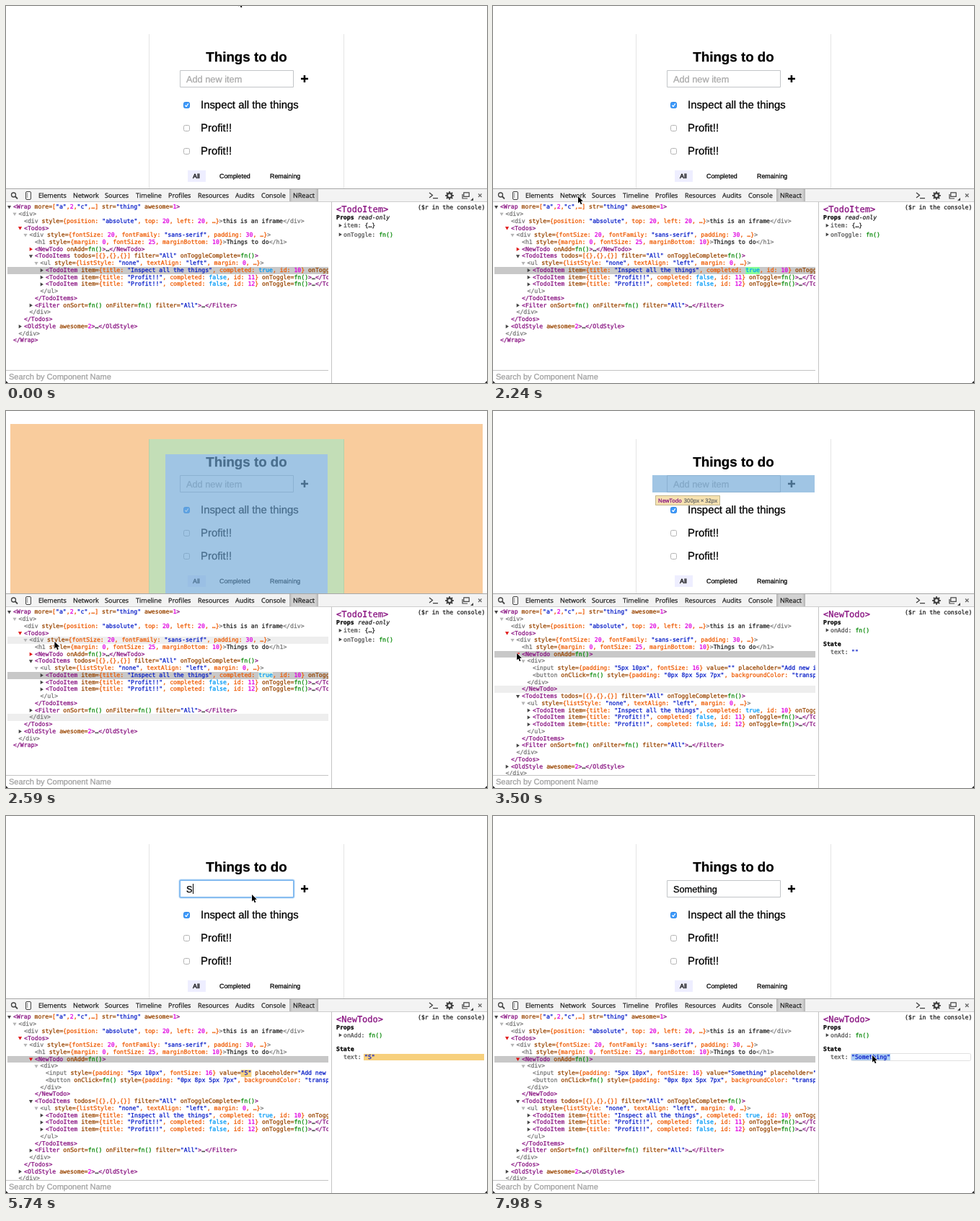
An HTML page with a canvas that plays this animation: 667 px wide and 523 px high, repeating every 8 s.

```html
<!DOCTYPE html>
<html lang="en">
<head>
<meta charset="utf-8">
<title>Component inspector</title>
<style>
html, body { margin: 0; width: 100%; height: 100%; overflow: hidden; background: #fff; }
canvas { display: block; }
</style>
</head>
<body>
<canvas id="stage" width="667" height="523"></canvas>
<script>
const ctx = document.getElementById('stage').getContext('2d');
const LOOP = 8000, STEP = 70;
const CW = 4.92, ROW = 9.74, TREE_TOP = 274.3;
const SANS = '"Liberation Sans", Arial, sans-serif';
const MONO = '"DejaVu Sans Mono", monospace';
const UI = '"Open Sans", sans-serif';
const CODE = `${CW / 0.602}px ${MONO}`;
const C = {
  comp: '#881280', dom: '#777', attr: '#994500', key: '#ee5a00', str: '#0a1fc8',
  num: '#e000e0', bool: '#0099f5', fn: '#0a8a0a', text: '#222'
};

// Times at which things happen
const T = { hover: 910, off: 1610, on: 1960, select: 3150, expand: 3290, focus: 4970,
  type: 5740, typed: 6380, field: 7350, edit: 7770 };

// Pointer path: time, x, y
const PATH = [
  [0, 322, -9], [140, 322, -9], [210, 319, 30], [280, 305, 118], [350, 299, 142], [560, 299, 142],
  [630, 297, 137], [840, 297, 137], [1050, 292, 137], [1120, 292, 137], [1260, 285, 134],
  [1330, 285, 134], [1540, 303, 134], [1960, 303, 134], [2170, 139, 228], [2240, 118, 264],
  [2310, 100, 285], [2380, 88, 302], [2450, 82, 310], [2660, 60, 325], [2870, 40, 336],
  [3010, 33, 336], [3990, 33, 336], [4060, 50, 325], [4130, 78, 313], [4200, 140, 288],
  [4270, 230, 238], [4340, 328, 165], [4410, 373, 135], [4620, 362, 121], [4830, 344, 109],
  [5040, 341, 109], [6930, 341, 109], [7000, 380, 113], [7070, 450, 140], [7210, 575, 280],
  [7350, 624, 340], [7420, 622, 338], [7700, 526, 332], [8000, 526, 332]
];

const clamp = (v, a, b) => Math.max(a, Math.min(b, v));

function pointer(t) {
  const i = Math.max(1, PATH.findIndex(p => p[0] >= t));
  const [t0, x0, y0] = PATH[i - 1], [t1, x1, y1] = PATH[i];
  const u = clamp((t - t0) / (t1 - t0), 0, 1);
  return { x: x0 + (x1 - x0) * u, y: y0 + (y1 - y0) * u };
}

function rect(x, y, w, h, color) {
  ctx.fillStyle = color;
  ctx.fillRect(x, y, w, h);
}

function frame(x, y, w, h, color) {
  ctx.strokeStyle = color;
  ctx.lineWidth = 1;
  ctx.strokeRect(x + .5, y + .5, w - 1, h - 1);
}

function rounded(x, y, w, h, r, fill, stroke) {
  ctx.beginPath();
  ctx.roundRect(x, y, w, h, r);
  if (fill) { ctx.fillStyle = fill; ctx.fill(); }
  if (stroke) { ctx.strokeStyle = stroke; ctx.lineWidth = 1; ctx.stroke(); }
}

// A hairline outline gives the slightly heavy look of smoothed type
function text(s, x, y, font, color) {
  ctx.font = font;
  ctx.fillStyle = ctx.strokeStyle = color;
  ctx.lineWidth = .28;
  ctx.lineJoin = 'round';
  ctx.fillText(s, x, y);
  ctx.strokeText(s, x, y);
}

function poly(points, fill) {
  ctx.beginPath();
  points.forEach(([x, y]) => ctx.lineTo(x, y));
  ctx.closePath();
  if (fill) { ctx.fillStyle = fill; ctx.fill(); }
}

function line(points, color, width) {
  ctx.beginPath();
  points.forEach(([x, y], i) => i ? ctx.lineTo(x, y) : ctx.moveTo(x, y));
  ctx.strokeStyle = color;
  ctx.lineWidth = width;
  ctx.stroke();
}

function arrow(x, y, open, color) {
  poly(open ? [[x - 2.6, y - 2], [x + 2.6, y - 2], [x, y + 2.6]]
            : [[x - 1.8, y - 2.6], [x + 2.4, y], [x - 1.8, y + 2.6]], color);
}

// Syntax colouring, one fixed-width cell per character
const TOKEN = /<\/?\w+|>[^<]*|"[^"]*"|\w+=|\w+:|fn\(\)|true|false|\d+|\s+|./g;
function code(s, x, y) {
  const tag = /^<\/?[A-Z]/.test(s) ? C.comp : C.dom;
  for (const m of s.matchAll(TOKEN)) {
    const k = m[0], px = x + m.index * CW;
    let color = C.key;
    if (k[0] === '<') color = tag;
    else if (k[0] === '>') {
      text('>', px, y, CODE, tag);
      text(k.slice(1), px + CW, y, CODE, C.text);
      continue;
    }
    else if (k[0] === '"') color = C.str;
    else if (/=$/.test(k)) color = C.attr;
    else if (k === 'fn()') color = C.fn;
    else if (k === 'true' || k === 'false') color = C.bool;
    else if (/^\d/.test(k)) color = C.num;
    text(k, px, y, CODE, color);
  }
}

// Row: depth, marker (v open, > closed, o pale, r red), markup, name shared by opening and closing rows
function treeRows(s) {
  const item = (title, done, id) => [6, '>',
    `<TodoItem item={title: "${title}", completed: ${done}, id: ${id}} onToggle=fn()>…</TodoItem>`, 'item' + id];
  const entry = s.expanded ? [
    [4, 'rv', '<NewTodo onAdd=fn()>', 'new'],
    [5, 'ov', '<div>', 'newdiv'],
    [6, '', `<input style={padding: "5px 10px", fontSize: 16} value="${s.value}" placeholder="Add new item">`, 'input'],
    [6, '', '<button onClick=fn() style={padding: "0px 8px 5px 7px", backgroundColor: "transparent"}>', 'button'],
    [5, '', '</div>', 'newdiv'],
    [4, '', '</NewTodo>', 'new']
  ] : [[4, 'r>', '<NewTodo onAdd=fn()>…</NewTodo>', 'new']];
  return [
    [0, 'v', '<Wrap more=["a",2,"c",…] str="thing" awesome=1>', 'wrap'],
    [1, 'ov', '<div>', 'outer'],
    [2, '', '<div style={position: "absolute", top: 20, left: 20, …}>this is an iframe</div>', 'iframe'],
    [2, 'rv', '<Todos>', 'todos'],
    [3, 'ov', '<div style={fontSize: 20, fontFamily: "sans-serif", padding: 30, …}>', 'box'],
    [4, '', '<h1 style={margin: 0, fontSize: 25, marginBottom: 10}>Things to do</h1>', 'h1'],
    ...entry,
    [4, 'v', '<TodoItems todos=[{},{},{}] filter="All" onToggleComplete=fn()>', 'items'],
    [5, 'ov', '<ul style={listStyle: "none", textAlign: "left", margin: 0, …}>', 'ul'],
    item('Inspect all the things', s.done, 10),
    item('Profit!!', false, 11),
    item('Profit!!', false, 12),
    [5, '', '</ul>', 'ul'],
    [4, '', '</TodoItems>', 'items'],
    [4, '>', '<Filter onSort=fn() onFilter=fn() filter="All">…</Filter>', 'filter'],
    [3, '', '</div>', 'box'],
    [2, '', '</Todos>', 'todos'],
    [2, '>', '<OldStyle awesome=2>…</OldStyle>', 'old'],
    [1, '', '</div>', 'outer'],
    [0, '', '</Wrap>', 'wrap']
  ];
}

function check(y, on) {
  rounded(246.5, y - 3.5, 8, 8, 2, on ? '#3b99fc' : '#fff', on ? '#2f86e4' : '#b4b4b4');
  if (on) line([[248.3, y + .6], [250, y + 2.5], [252.8, y - 1.6]], '#fff', 1.3);
}

function drawPage(s) {
  rect(198, 39, 1, 214, '#e4e4e4');
  rect(468, 39, 1, 214, '#e4e4e4');
  text('Things to do', 277.3, 77, `bold 18.75px ${SANS}`, '#000');

  if (s.focused) {
    rounded(239.5, 87.5, 161, 27, 3, '#b9d9f7');
    rounded(240.5, 88.5, 159, 25, 2, '#76b3ee');
    rect(242, 90, 156, 22, '#fff');
  } else frame(241, 89, 158, 24, '#c2c5c8');
  text(s.value || 'Add new item', 250, 105.5, `12.75px ${SANS}`, s.value ? '#000' : '#a9a9a9');
  if (s.caret) rect(250 + Math.round(s.value ? ctx.measureText(s.value).width : 0), 94, 1, 14, '#000');
  rect(409, 99.7, 10, 2.5, '#000');
  rect(412.7, 96, 2.5, 10, '#000');

  ['Inspect all the things', 'Profit!!', 'Profit!!'].forEach((label, i) => {
    const y = 137 + i * 32;
    if (s.item === i) rect(229, y - 16, 209, 32, '#eeecec');
    check(y, i === 0 && s.done);
    text(label, 270, y + 4.6, `14.9px ${SANS}`, '#000');
  });
  rect(252, 228, 25, 16, '#eef');
  [['All', 259], ['Completed', 296], ['Remaining', 366]].forEach(([l, x]) =>
    text(l, x, 239, `8.85px ${SANS}`, '#000'));
}

function tip(x, y, name, size) {
  ctx.font = `7.5px ${UI}`;
  const a = ctx.measureText(name).width, b = ctx.measureText(size).width;
  const w = Math.round(a + b + 11);
  rect(x, y, w, 14, '#f6e2b0');
  frame(x, y, w, 14, '#c3b791');
  text(name, x + 4, y + 9.8, ctx.font, C.comp);
  text(size, x + 7 + a, y + 9.8, ctx.font, '#666');
}

function drawOverlay(name) {
  const blue = 'rgba(111,168,214,.66)', margin = 'rgba(246,178,107,.66)', padding = 'rgba(147,196,125,.55)';
  const shade = (x, y, w, h, label, size) => {
    rect(x, y, w, h, blue);
    tip(x + 4, y + h + 4, label, size);
  };
  ctx.save();
  ctx.beginPath();
  ctx.rect(0, 0, 667, 253);
  ctx.clip();
  if (name === 'iframe') shade(15, 15, 142, 21, 'div', '190px × 29px');
  if (name === 'new') shade(221, 89, 225, 24, 'NewTodo', '300px × 32px');
  if (name === 'h1') shade(221, 60, 225, 22, 'h1', '300px × 29px');
  if (name === 'wrap' || name === 'outer') rect(6, 39, 655, 214, blue);
  if (name === 'todos' || name === 'box') {
    rect(6, 18, 655, 21, margin);
    rect(6, 39, 192, 214, margin);
    rect(469, 39, 192, 214, margin);
    rect(198, 39, 271, 21, padding);
    rect(198, 60, 23, 193, padding);
    rect(446, 60, 23, 193, padding);
    rect(221, 60, 225, 193, blue);
  }
  ctx.restore();
}

function drawToolbar() {
  rect(0, 253, 667, 19, '#f3f3f3');
  rect(0, 253, 667, 1, '#a8a8a8');
  rect(0, 271, 667, 1, '#cdcdcd');
  const tab = ctx.createLinearGradient(393, 0, 433, 0);
  [[0, '#b4b4b4'], [.1, '#d2d2d2'], [.9, '#d2d2d2'], [1, '#b4b4b4']].forEach(([u, c]) => tab.addColorStop(u, c));
  rect(393, 254, 40, 17, tab);
  [['Elements', 45], ['Network', 93], ['Sources', 137], ['Timeline', 180], ['Profiles', 225],
   ['Resources', 266], ['Audits', 318], ['Console', 354], ['NReact', 398]].forEach(([l, x]) =>
    text(l, x, 266, `9px ${UI}`, '#222'));

  const dark = '#444';
  ctx.beginPath();
  ctx.arc(10.5, 262, 3, 0, 7);
  ctx.strokeStyle = dark;
  ctx.lineWidth = 1.3;
  ctx.stroke();
  line([[12.7, 264.2], [16, 267.5]], dark, 1.8);
  rounded(27.5, 257.5, 7, 11, 1.5, null, dark);
  rect(29, 259, 1, 7, '#999');
  line([[587, 259], [591.5, 262.5], [587, 266]], dark, 1.4);
  rect(592, 266, 7, 1.3, dark);

  ctx.beginPath();
  ctx.arc(615, 263, 3.2, 0, 7);
  ctx.lineWidth = 2.4;
  ctx.stroke();
  for (let i = 0; i < 8; i++) {
    const c = Math.cos(i * Math.PI / 4), n = Math.sin(i * Math.PI / 4);
    line([[615 + c * 3.5, 263 + n * 3.5], [615 + c * 5.8, 263 + n * 5.8]], dark, 2);
  }
  line([[633, 261], [633, 267], [640, 267]], dark, 1.2);
  ctx.strokeRect(634.8, 258.8, 7.4, 5.6);
  poly([[648, 266], [648, 270], [644, 270]], dark);
  line([[655, 260.5], [659.5, 265]], '#666', 1.2);
  line([[659.5, 260.5], [655, 265]], '#666', 1.2);
}

const flashColor = u => `rgba(247,208,125,${u})`;

function drawTree(s) {
  ctx.save();
  ctx.beginPath();
  ctx.rect(0, 272, 447, 233);
  ctx.clip();
  s.rows.forEach(([depth, mark, markup, name], i) => {
    const y0 = TREE_TOP + i * ROW, base = y0 + 7, x = 10 + depth * 7.5;
    const top = Math.round(y0), h = Math.round(y0 + ROW) - top;
    const closing = markup[1] === '/';
    if (name === s.selected && !closing) rect(2, top, 445, h, '#c8c8c8');
    else if (name === s.hover) rect(2, top, 445, h, '#eee');
    if (name === 'item10' && s.toggle < 1) {
      const u = s.toggle, mix = v => Math.round(v + (235 - v) * Math.min(1, u * 1.5));
      ctx.globalAlpha = Math.min(1, (1 - u) * 2.5);
      rect(x + 60 * CW, top, CW * (s.done ? 4 : 5), h, `rgb(${mix(50)},255,${mix(80)})`);
      ctx.globalAlpha = 1;
    }
    if (name === 'input' && s.flash > 0)
      rect(x + 55 * CW, top, (s.value.length + 2) * CW, h, flashColor(s.flash));
    if (mark) {
      const color = mark[0] === 'r' ? '#e01010' : mark[0] === 'o' ? '#b5b5b5' : '#444';
      arrow(x - 5.5, y0 + 4.7, mark.endsWith('v'), color);
    }
    code(markup, x, base);
  });
  ctx.restore();
  rect(0, 505, 447, 1, '#c4c4c4');
  text('Search by Component Name', 4, 518, `11px ${SANS}`, '#a0a0a0');
}

function drawSide(s) {
  const bold = 'bold ' + CODE;
  const prop = (key, y) => {
    arrow(463.5, y - 2.5, false, '#444');
    text(key + ':', 468, y, CODE, '#555');
    return 468 + (key.length + 2) * CW;
  };
  rect(451, 272, 1, 251, '#c4c4c4');
  text('($r in the console)', 571, 282, CODE, '#222');
  const isNew = s.selected === 'new';
  text(isNew ? '<NewTodo>' : '<TodoItem>', 458, 286, `12px ${MONO}`, C.comp);
  text('Props', 458, 296, bold, '#000');
  if (!isNew) {
    text('read-only', 488, 296, 'italic ' + CODE, '#222');
    text('{…}', prop('item', 307), 307, CODE, '#222');
    text('fn()', prop('onToggle', 319.5), 319.5, CODE, C.fn);
    return;
  }
  text('fn()', prop('onAdd', 306.5), 306.5, CODE, C.fn);
  text('State', 458, 325.5, bold, '#000');
  if (s.flash > 0) rect(496, 330, 167, 9, flashColor(s.flash));
  if (s.field) rounded(496.5, 329.5, 166, 10, 2, '#fff', '#e0e0e0');
  if (s.editing) rect(497, 330, 54, 9, '#abcdf5');
  text('text:', 468, 336.8, CODE, '#555');
  text(`"${s.value}"`, 497, 336.8, CODE, C.str);
}

function drawPointer({ x, y }) {
  ctx.save();
  ctx.translate(x, y);
  ctx.lineJoin = 'round';
  poly([[0, 0], [0, 9.6], [2.2, 7.6], [3.8, 11.2], [5.4, 10.5], [3.9, 7], [6.8, 6.8]]);
  ctx.strokeStyle = '#fff';
  ctx.lineWidth = 1.6;
  ctx.stroke();
  ctx.fillStyle = '#000';
  ctx.fill();
  ctx.restore();
}

function stateAt(t) {
  const p = pointer(t);
  const letters = clamp(Math.floor((t - T.type) / 80) + 1, 0, 9);
  const s = {
    p,
    value: 'Something'.slice(0, letters),
    done: t < T.off || t >= T.on,
    toggle: t < T.off ? 1 : clamp((t - (t < T.on ? T.off : T.on)) / 900, 0, 1),
    selected: t < T.select ? 'item10' : 'new',
    expanded: t >= T.expand,
    focused: t >= T.focus && t < T.edit,
    flash: t < T.type ? 0 : clamp(1 - (t - Math.min(t, T.typed)) / 950, 0, 1),
    field: t >= T.field,
    editing: t >= T.edit
  };
  const blinkOff = (t >= 5600 && t < T.type) || (t >= 6900 && t < 7400);
  s.caret = s.focused && !blinkOff;
  const overList = t >= T.hover && p.x >= 229 && p.x < 438 && p.y >= 121 && p.y < 217;
  s.item = overList ? Math.floor((p.y - 121) / 32) : -1;
  s.rows = treeRows(s);
  const row = s.rows[Math.floor((p.y - TREE_TOP) / ROW)];
  s.hover = row && p.x < 447 && p.y < 505 ? row[3] : '';
  return s;
}

function draw(t) {
  const s = stateAt(t);
  rect(0, 0, 667, 523, '#fff');
  drawPage(s);
  drawOverlay(s.hover);
  drawToolbar();
  drawTree(s);
  drawSide(s);
  poly([[0, 520], [0, 523], [3, 523]], '#222');
  poly([[667, 520], [667, 523], [664, 523]], '#222');
  drawPointer(s.p);
}

ctx.textRendering = 'geometricPrecision';
const start = performance.now();
function tick() {
  const t = (performance.now() - start) % LOOP;
  draw(Math.floor(t / STEP) * STEP);
  requestAnimationFrame(tick);
}
tick();
</script>
</body>
</html>
```
